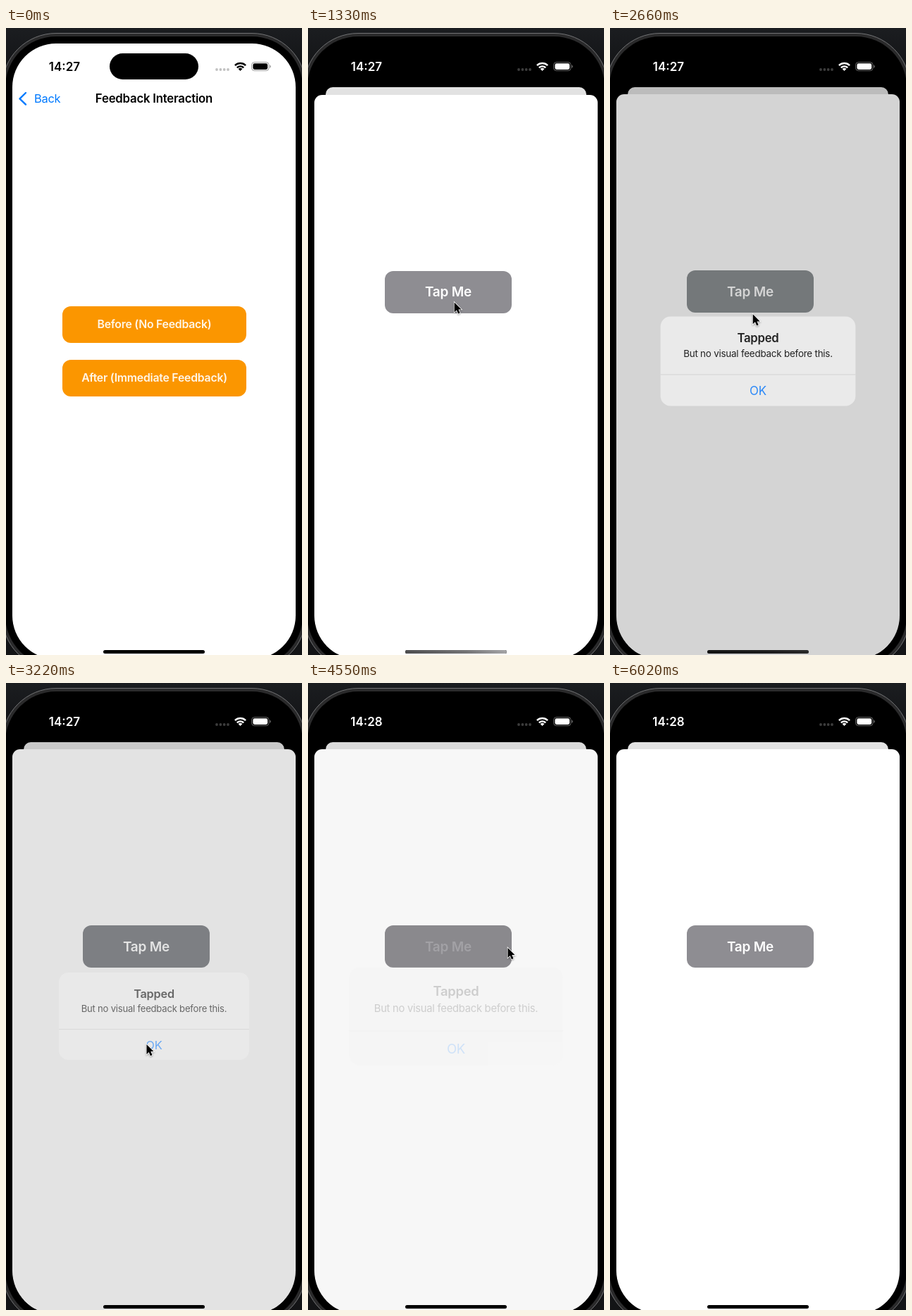
Animation of 420x890 px, one loop 6.37 s. Source, as an HTML page:

```html
<!DOCTYPE html>
<html lang="en">
<head>
<meta charset="utf-8">
<title>Feedback Interaction</title>
<style>
  html, body { margin: 0; width: 100%; height: 100%; overflow: hidden; background: #17191c; }
  #stage {
    position: relative; width: 420px; height: 890px; overflow: hidden;
    background: linear-gradient(#1b1d20, #131416 60px);
    font-family: Inter, Roboto, sans-serif; letter-spacing: -.014em;
  }
  #stage div, #stage svg { position: absolute; }
  .shell {
    left: -6px; top: 7px; width: 432px; height: 904px; box-sizing: border-box;
    border: 1px solid #727375; border-radius: 77px; background: #2a2a2b;
  }
  .bezel { left: -1px; top: 12px; width: 422px; height: 894px; border-radius: 72px; background: #000; }
  .screen {
    left: 9px; top: 22px; width: 402px; height: 874px;
    overflow: hidden; border-radius: 62px; background: #000;
  }
  .fill { inset: 0; }
  #card { inset: 0; overflow: hidden; border-radius: 11px; background: #fff; transform-origin: 50% 0; }
  #shade, #dim { background: #000; }
  .label { transform: translate(-50%, -50%); white-space: nowrap; line-height: 1; font-weight: 600; }
  .title { left: 201px; top: 78px; font-size: 16.8px; }
  #back { left: 0; top: 0; color: rgb(0, 122, 255); }
  #back .label { left: 31px; top: 78px; transform: translateY(-50%); font-size: 16.5px; font-weight: 400; letter-spacing: -.02em; }
  .choice { left: 71px; width: 261px; height: 52px; border-radius: 12px; background: #fb9600; }
  .choice .label { left: 50%; top: 50%; font-size: 15.8px; color: #fff6e8; }
  #sheet { left: 0; top: 0; width: 402px; height: 874px; border-radius: 11px 11px 0 0; background: #fff; }
  #tap { left: 100px; top: 250px; width: 180px; height: 60px; border-radius: 12px; }
  #tapText { left: 50%; top: 50%; font-size: 19px; color: #fff; }
  #alert { left: 66px; top: 389px; width: 270px; height: 124px; border-radius: 14px; background: #efefef; }
  #alert .label { left: 50%; }
  .head { top: 29.5px; font-size: 16.3px; }
  #alert .note { top: 51.5px; font-size: 13.1px; font-weight: 400; }
  #alert .ok { top: 102.5px; font-size: 16.5px; font-weight: 400; color: #0a7aff; }
  .rule { left: 0; right: 0; top: 80px; height: 1px; background: #d3d3d4; }
  .island { left: 147px; top: 36px; width: 126px; height: 37px; border-radius: 19px; background: #000; }
  #clock { left: 83px; top: 54.5px; font-size: 17px; letter-spacing: 0; }
  .home { left: 138px; top: 883px; width: 144px; height: 5px; border-radius: 3px; background: #000; overflow: hidden; }
  #glow { background: linear-gradient(90deg, #4e4e50, #747476 60%, #a5a5a7); }
  #pointer { left: 0; top: 0; overflow: visible; }
  #arrow { filter: drop-shadow(0 1px 1px rgba(0, 0, 0, .35)); }
</style>
</head>
<body>
<div id="stage">
  <div class="shell"></div>
  <div class="bezel"></div>
  <div class="screen">
    <div id="card">
      <div id="back">
        <svg width="30" height="100" fill="none" stroke="currentColor" stroke-width="2.4" stroke-linecap="round" stroke-linejoin="round">
          <path d="M19 70 L10.5 78.3 L19 86.6"/>
        </svg>
        <div class="label">Back</div>
      </div>
      <div class="label title">Feedback Interaction</div>
      <div class="choice" style="top:373px"><div class="label">Before (No Feedback)</div></div>
      <div class="choice" style="top:449px"><div class="label">After (Immediate Feedback)</div></div>
      <div id="shade" class="fill"></div>
    </div>
    <div id="sheet">
      <div id="tap"><div id="tapText" class="label">Tap Me</div></div>
    </div>
    <div id="dim" class="fill"></div>
    <div id="alert">
      <div class="label head">Tapped</div>
      <div class="label note">But no visual feedback before this.</div>
      <div class="rule"></div>
      <div class="label ok">OK</div>
    </div>
  </div>
  <div class="island"></div>
  <div id="status">
    <div id="clock" class="label">14:27</div>
    <svg width="420" height="80" fill="currentColor">
      <g opacity=".24">
        <circle cx="299" cy="59" r="1.9"/><circle cx="304.4" cy="59" r="1.9"/>
        <circle cx="309.7" cy="59" r="1.9"/><circle cx="315" cy="59" r="1.9"/>
      </g>
      <g fill="none" stroke="currentColor" stroke-width="2.4">
        <path d="M324.9 53.1 A10.8 10.8 0 0 1 340.1 53.1"/>
        <path d="M327.8 56.3 A6.8 6.8 0 0 1 337.2 56.3"/>
      </g>
      <path d="M332.5 61 L329.6 58 A4.3 4.3 0 0 1 335.4 58 Z"/>
      <rect x="348.6" y="48.6" width="24.4" height="12" rx="3.8" fill="none" stroke="currentColor" opacity=".4"/>
      <rect x="350.4" y="50.3" width="20.8" height="8.6" rx="2.4"/>
      <path d="M374.4 52.6 A2.2 2.2 0 0 1 374.4 56.7 Z" opacity=".45"/>
    </svg>
  </div>
  <div class="home"><div id="glow" class="fill"></div></div>
  <svg id="pointer" width="1" height="1">
    <g id="ring" fill="none">
      <circle cx=".5" cy="2" r="20" stroke="#fff" stroke-width="5"/>
      <circle cx=".5" cy="2" r="20" stroke="#000" stroke-width="3"/>
    </g>
    <path id="arrow" d="M0 0 V14 L3.2 11 L5.5 16.2 L8 15.1 L5.8 10.1 H10 Z" stroke="#fff" stroke-width="1.6" paint-order="stroke"/>
  </svg>
</div>
<script>
const LOOP = 6370, STEP = 70;
const el = {};
document.querySelectorAll('[id]').forEach(n => el[n.id] = n);

// time, x, y
const path = [
  [70, 48, 102], [350, 226, 428], [630, 226, 428], [840, 230, 440],
  [1120, 230, 440], [1400, 203.5, 380], [2520, 203.5, 380], [3010, 199.5, 513],
  [3290, 199.5, 513], [3780, 283.5, 376], [4620, 283.5, 376], [5040, 224.5, 493],
  [5320, 224.5, 493], [5740, 222, 882], [5880, 222, 882], [5950, 222, 886]
];
const presses = [[490, 560], [1610, 2450], [3080, 3150], [3850, 4480], [5110, 5250]];
const alerts = [[2480, 3150], [4510, 5250]];
const textFade = [[1540, 1], [1680, .22], [2520, .22], [2660, 1], [3780, 1], [3850, .22], [4550, .22], [4690, 1]];
const homeGlow = [[630, 0], [840, 1], [2450, 1], [2730, 0]];
const statusTone = [[680, 0], [1000, 1]];

const smooth = k => k * k * (3 - 2 * k);
const mix = (a, b, k) => a + (b - a) * k;
const rgb = (a, b, k) => `rgb(${a.map((v, i) => Math.round(mix(v, b[i], k)))})`;

function track(t, keys, col = 1, ease = k => k) {
  if (t <= keys[0][0]) return keys[0][col];
  const i = keys.findIndex(k => k[0] >= t);
  if (i < 0) return keys[keys.length - 1][col];
  const a = keys[i - 1], b = keys[i];
  return mix(a[col], b[col], ease((t - a[0]) / (b[0] - a[0])));
}

// Critically damped spring from 0 to 1
function spring(ms, w) {
  const x = Math.max(0, ms) / 1000 * w;
  return 1 - (1 + x) * Math.exp(-x);
}

function render(t) {
  const p = spring(t - 560, 11.8);
  el.card.style.transform = `translateY(${62 * p}px) scale(${1 - .08 * p})`;
  el.shade.style.opacity = .115 * Math.sqrt(p);
  el.back.style.color = rgb([0, 122, 255], [142, 142, 147], Math.min(1, p * 1.2));
  el.sheet.style.transform = `translateY(${mix(874, 72, p)}px)`;

  let shown = 0, scale = 1;
  for (const [start, end] of alerts) {
    if (t < start || t > end + 630) continue;
    const enter = spring(t - start, 18);
    shown = t > end ? Math.exp((end - t) / 115) : enter;
    scale = mix(1.15, 1, enter);
  }
  el.dim.style.opacity = .2 * shown;
  el.alert.style.opacity = shown;
  el.alert.style.transform = `scale(${scale})`;
  el.tap.style.background = rgb([142, 141, 146], [139, 144, 147], shown);
  el.tapText.style.opacity = track(t, textFade);

  el.status.style.color = rgb([0, 0, 0], [255, 255, 255], track(t, statusTone));
  el.clock.textContent = t < 3990 ? '14:27' : '14:28';
  el.glow.style.opacity = track(t, homeGlow);

  const x = track(t, path, 1, smooth), y = track(t, path, 2, smooth);
  el.pointer.style.transform = `translate(${x}px, ${y}px)`;
  el.pointer.style.display = t >= 70 && t < 6020 ? '' : 'none';
  el.ring.style.display = presses.some(([a, b]) => t >= a && t < b) ? '' : 'none';
}

const origin = performance.now();
function tick() {
  const t = (performance.now() - origin) % LOOP;
  render(Math.floor(t / STEP) * STEP);
  requestAnimationFrame(tick);
}
tick();
</script>
</body>
</html>
```
